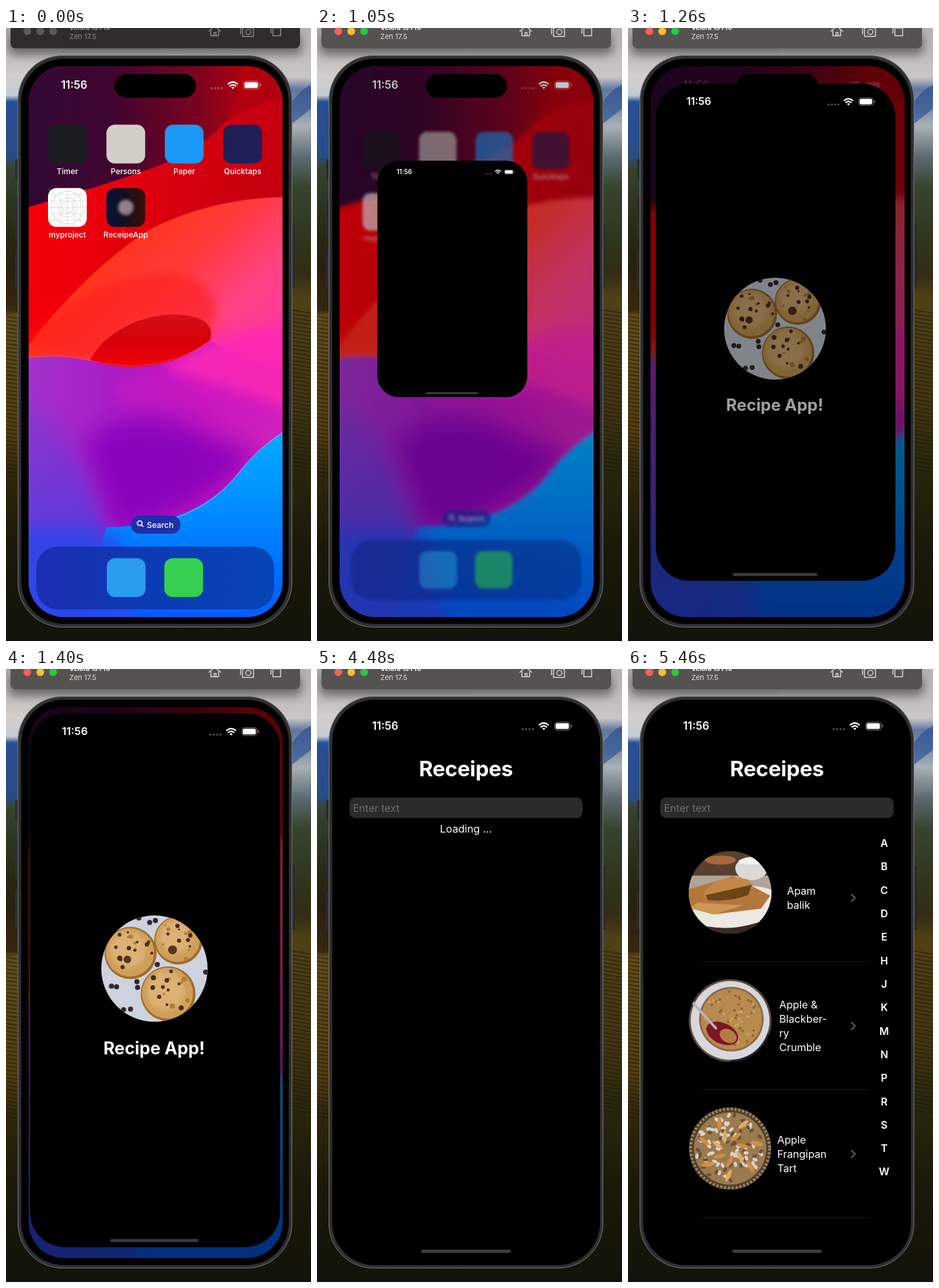
An HTML page for the animation above (8 s loop, 472x948 px).

```html
<!DOCTYPE html>
<html lang="en">
<head>
<meta charset="utf-8">
<title>Recipe app launch</title>
<style>
html, body { margin: 0; width: 100%; height: 100%; overflow: hidden; background: #14180c; }
svg { display: block; width: 472px; height: 948px; }
text { font-family: Inter, Roboto, sans-serif; fill: #fff; }
.mid { text-anchor: middle; }
.line { fill: none; stroke-linecap: round; stroke-linejoin: round; }
</style>
</head>
<body>
<svg id="stage" viewBox="0 0 472 948"></svg>
<script>
const stage = document.getElementById('stage');
const $ = id => document.getElementById(id);

let seed = 7;
const rnd = () => (seed = seed * 16807 % 2147483647) / 2147483647;
const times = (n, fn) => Array.from({ length: n }, (_, i) => fn(i)).join('');

// Markup helpers
const rect = (x, y, w, h, r, fill, extra = '') =>
  `<rect x="${x}" y="${y}" width="${w}" height="${h}" rx="${r}" fill="${fill}" ${extra}/>`;
const disc = (x, y, r, fill, extra = '') =>
  `<circle cx="${x}" cy="${y}" r="${r}" fill="${fill}" ${extra}/>`;
const oval = (x, y, rx, ry, fill, turn = 0) =>
  `<ellipse rx="${rx}" ry="${ry}" fill="${fill}" transform="translate(${x} ${y}) rotate(${turn})"/>`;
const shape = (d, fill, extra = '') => `<path d="${d}" fill="${fill}" ${extra}/>`;
const line = (d, color, width = 1, extra = '') =>
  `<path class="line" d="${d}" stroke="${color}" stroke-width="${width}" ${extra}/>`;
const text = (x, y, size, weight, str, extra = '') =>
  `<text x="${x}" y="${y}" font-size="${size}" font-weight="${weight}" ${extra}>${str}</text>`;
const mid = 'class="mid"';
const soft = n => `style="filter:blur(${n}px)"`;
const gradient = (id, dir, stops) => {
  const [x1, y1, x2, y2] = dir;
  return `<linearGradient id="${id}" x1="${x1}" y1="${y1}" x2="${x2}" y2="${y2}">` +
    stops.map(([at, c]) => `<stop offset="${at}" stop-color="${c}"/>`).join('') + '</linearGradient>';
};
const clip = (id, body) => `<clipPath id="${id}">${body}</clipPath>`;
const down = [0, 0, 0, 1], across = [0, 0, 1, 0];

const defs = `<defs>
${gradient('left', down, [[0, '#a8a5a3'], [.08, '#d2cfcc'], [.11, '#c5cbd4'], [.12, '#2d5599'], [.2, '#35527a'],
  [.23, '#36422f'], [.33, '#262b15'], [.39, '#2a1f10'], [.46, '#37270e'], [.47, '#624c1b'], [.66, '#543d10'],
  [.73, '#30260c'], [.84, '#1b1a09'], [1, '#12130a']])}
${gradient('right', down, [[0, '#b4b1af'], [.08, '#c9c7c6'], [.1, '#5f779f'], [.13, '#7c8ca6'], [.16, '#a9b0b6'],
  [.21, '#5c6b72'], [.26, '#36442f'], [.35, '#30351d'], [.4, '#332c15'], [.44, '#4f4017'], [.62, '#423513'],
  [.7, '#2c280e'], [.84, '#1b190a'], [1, '#12130a']])}
${gradient('dusk', across, [[0, '#2e0a35'], [.45, '#400530'], [.8, '#7c0320'], [1, '#b00010']])}
${gradient('red', across, [[0, '#fa0008'], [.5, '#dc000e'], [1, '#bd0010']])}
${gradient('coral', [.35, .1, .95, .65], [[0, '#ff3210'], [.35, '#ff3b3e'], [.6, '#ff4282'], [1, '#ff30b2']])}
${gradient('leaf', down, [[0, '#d41018'], [.5, '#d60008'], [1, '#ee0008']])}
${gradient('wave', across, [[0, '#a03acc'], [.35, '#aa1cc6'], [.65, '#c616be'], [1, '#d22cba']])}
${gradient('deep', down, [[0, '#5a3cdc00'], [.4, '#5a3cdcbb'], [.75, '#3a46e4'], [1, '#1446f4']])}
${gradient('sea', down, [[0, '#02b0ff'], [.3, '#0094ff'], [.6, '#0070ff'], [1, '#0648f4']])}
${gradient('dock', across, [[0, '#1b2fb2'], [.5, '#0c3bb4'], [1, '#0645b6']])}
${gradient('space', across, [[0, '#08123a'], [.5, '#14101c'], [1, '#3a0e08']])}
${clip('screen', rect(35, 59, 393, 852, 55, '#000'))}
${clip('frame', '<rect id="hole"/>')}
${clip('plate', disc(230.5, 460.5, 83.5, '#000'))}
${clip('dish', disc(0, 0, 64, '#000'))}
</defs>`;

const backdrop = rect(0, 0, 236, 948, 0, 'url(#left)') + rect(236, 0, 236, 948, 0, 'url(#right)') +
  shape('M0 120Q10 105 20 125V205H0ZM472 88Q455 95 440 118V150L472 125Z', '#244c92', 'opacity=".6"') +
  line(times(42, i => `M0 ${446 + i * 6}l20 3M442 ${436 + i * 6}l30 5`), '#1c1a08', 2, 'opacity=".55"') +
  rect(4, 10, 454, 32, 10, '#000', `opacity=".4" ${soft(7)}`);

const toolbar = rect(7, -20, 448, 51.5, 8, '#555351', 'id="bar"') +
  times(3, i => disc(33 + i * 20, 5, 6, '#5b5a5a', `id="light${i}"`)) +
  '<g id="caption">' + text(98, 3, 10, 700, 'Velora 15 Pro') +
  text(98, 17, 11, 400, 'Zen 17.5', 'opacity=".8"') +
  line('M314 5l9-8 9 8M317 4v8h12v-8M322 12v-5h3v5' +
    'M366 0h3l2-3h6l2 3h4v13h-17ZM363 9v-11M371 6a4 4 0 1 0 8 0a4 4 0 1 0-8 0' +
    'M413 0h12v12h-12ZM410 8v-12', '#d8d6d4', 1.5) + '</g>';

const phone = rect(14, 203, 8, 32, 2, '#2c2c2e') + rect(14, 263, 8, 61, 2, '#2c2c2e') +
  rect(14, 342, 8, 62, 2, '#2c2c2e') + rect(439, 304, 8, 99, 2, '#2c2c2e') +
  rect(18.5, 42.5, 424, 884, 69, '#303032', 'stroke="#77777a"') +
  rect(23.5, 47.5, 414, 874, 65, '#000', 'stroke="#1a1a1b"');

const crest = 'M0 516Q70 500 130 514Q196 530 250 515Q292 503 316 483';
const wallpaper = rect(0, 20, 472, 930, 0, 'url(#red)') +
  shape('M0 20H372Q372 95 337 147Q300 190 225 217T0 287Z', 'url(#dusk)') +
  shape('M372 20Q372 95 337 147Q400 110 440 105V20Z', '#a8000e', 'opacity=".7"') +
  shape('M0 540Q100 392 220 313Q330 255 472 262V680H0Z', 'url(#coral)') +
  shape('M20 500Q100 400 210 385Q300 360 326 430L316 483Q250 400 130 514Z', '#ff1c18', `opacity=".55" ${soft(7)}`) +
  shape(crest + 'Q370 515 472 535V810H0Z', 'url(#wave)') +
  shape('M250 515Q292 503 316 483Q380 455 472 470V600Q380 580 250 530Z', '#fc28b6', `opacity=".9" ${soft(10)}`) +
  line('M190 562Q300 540 430 610', '#d018c2', 36, `opacity=".6" ${soft(12)}`) +
  shape('M120 640Q210 570 320 635L390 655Q310 750 170 780Z', '#8400bc', `opacity=".85" ${soft(18)}`) +
  shape('M-40 540Q100 570 150 772L190 990H-40Z', 'url(#deep)', soft(14)) +
  shape('M130 514C152 470 210 443 260 443Q326 445 316 483Q262 524 196 524Q160 524 130 514Z', 'url(#leaf)') +
  line(crest, '#ff5a70', 1, 'opacity=".6"') +
  shape('M472 600Q400 637 365 682Q300 770 155 772L100 990H472Z', 'url(#sea)') +
  shape('M0 776H150Q210 800 190 990H0Z', '#2c48ea', `opacity=".85" ${soft(12)}`) +
  line('M472 600Q400 637 365 682Q325 736 262 758', '#9cd8ff', 1, 'opacity=".8"');

const apps = [['Timer', '#1a1d20'], ['Persons', '#d1cfc7'], ['Paper', '#1c98f6'],
  ['Quicktaps', '#1e2056'], ['myproject', '#fff'], ['ReceipeApp', 'url(#space)']];
const icons = apps.map(([name, fill], i) => {
  const x = 65 + i % 4 * 90.4, y = i < 4 ? 149.5 : 247.5;
  return `<g ${i == 5 ? 'id="launcher"' : ''}>` + rect(x, y, 60, 60, 13, fill) +
    (i == 5 ? disc(x + 30, y + 30, 12, '#8f7f88', soft(2)) : '') +
    text(x + 30, y + 76, 12, 500, name, mid) + '</g>';
}).join('') +
  line(times(5, i => `M${75 + i * 10} 248v59M66 ${257.5 + i * 10}h58`) + 'M66 249l58 57M124 249l-58 57', '#d4d4d4', .6) +
  [9, 15, 25].map(r => disc(95, 277.5, r, 'none', 'stroke="#c4c4c4" stroke-width=".7"')).join('') +
  rect(193, 754, 77, 28, 14, '#1d30a8') + line('M212 771l-2.6-2.6a3.6 3.6 0 1 1 .1-.1', '#fff', 1.5) +
  text(218, 772.5, 12.3, 500, 'Search') +
  rect(47, 802, 368, 97, 33, 'url(#dock)') +
  rect(156, 820, 60, 60, 13, '#2a9cee') + rect(245, 820, 60, 60, 13, '#35d04f');

const status = text(105.5, 94, 16.8, 600, '11:56', mid) +
  times(4, i => disc(318.3 + i * 5.3, 93, 1.7, '#fff', 'opacity=".3"')) +
  line('M344 86.5q7-6 14 0M346.7 89.6q4.3-3.6 8.6 0', '#fff', 2.2) + shape('M348.6 91.8q2.4-1.8 4.8 0L351 94.4Z', '#fff') +
  rect(367.5, 82, 24, 12.5, 4, 'none', 'stroke="#fff" stroke-opacity=".45"') +
  rect(369.2, 83.7, 20.6, 9.1, 2.6, '#fff') + rect(393, 86, 1.5, 4.5, .8, '#fff', 'opacity=".5"');

const cookie = (x, y, r) => disc(x, y, r, '#a06c2a') + disc(x - 1, y - 1, r - 3, '#cf9f5a') +
  disc(x - 4, y - 5, r - 13, '#dcb274', soft(4)) +
  times(16, () => {
    const a = rnd() * 6.28, d = Math.sqrt(rnd()) * r * .85;
    return disc(x + d * Math.cos(a), y + d * Math.sin(a), 1.6 + rnd() * 2.6, rnd() < .6 ? '#4c2a18' : '#b27c38');
  });
const chips = [[223, 388], [232, 385], [206, 381], [163, 488], [171, 489], [203, 481],
  [204, 490], [182, 525], [193, 524], [235, 454], [311, 466]];
const splash = '<g clip-path="url(#plate)">' + rect(140, 370, 180, 180, 0, '#ced2de') +
  chips.map(([x, y]) => disc(x, y, 4, '#34292a')).join('') +
  cookie(193, 436, 41) + cookie(268, 416, 38) + cookie(252, 500, 43) +
  disc(188, 446, 6, '#5a3420') + disc(259, 431, 7, '#5a3420') + '</g>' +
  text(230, 595, 27, 700, 'Recipe App!', mid);

const pancakes = rect(-64, -64, 128, 128, 0, '#58402f') + rect(-64, -26, 128, 60, 0, '#b0a397') +
  oval(-15, -50, 24, 7, '#a8683c') + oval(33, -37, 25, 18, '#dcdad6') + oval(33, -48, 20, 5, '#f3f1ed') +
  oval(5, 25, 78, 34, '#ece8e2', -8) +
  shape('M-64-5L5-25L62 5L48 25L-25 34L-64 24Z', '#b3763d') +
  shape('M-40 0Q-20-30 28-20L36-6Q0 4-40 8Z', '#c58747') + shape('M-38 4Q0-4 34-12L28 4Q0 15-34 12Z', '#6e4518') +
  shape('M-50 16L20 20L-25 34L-64 24Z', '#cf9655') + shape('M-64 45Q0 68 64 38V64H-64Z', '#3a2a22');
const crumble = rect(-64, -64, 128, 128, 0, '#5b4a3c') + rect(0, 20, 64, 44, 0, '#1c2038') +
  disc(0, 0, 61, '#d8d8dc') + disc(2, -2, 50, '#8d6a48') + disc(2, -2, 47, '#b78a4e') +
  times(60, () => {
    const a = rnd() * 6.28, d = Math.sqrt(rnd()) * 44;
    return disc(2 + d * Math.cos(a), -2 + d * Math.sin(a), 2, rnd() < .5 ? '#d0a566' : '#916430');
  }) + oval(-12, 20, 26, 16, '#7c1626', 25) + oval(-3, 24, 14, 10, '#b47a44', 30) +
  line('M-60-30L-22 12', '#b9b6b2', 4);
const tart = disc(0, 0, 64, '#51402f') +
  disc(0, 0, 61, 'none', 'stroke="#a48a64" stroke-width="4" stroke-dasharray="3 3"') + disc(0, 0, 56, '#9c7a50') +
  times(90, () => {
    const a = rnd() * 6.28, d = Math.sqrt(rnd()) * 53;
    return oval(d * Math.cos(a), d * Math.sin(a), 4, 2.5, rnd() < .65 ? '#d9d3ca' : '#6e5236', rnd() * 180);
  }) + times(20, i => {
    const a = i * .9 - 2, d = i < 7 ? 20 : 42;
    return oval(d * Math.cos(a), d * Math.sin(a), 10, 3, i % 3 ? '#cf8f3f' : '#e0ad62', a * 57 + 25);
  });

const recipes = [
  [pancakes, 246, 349, ['Apam', 'balik']],
  [crumble, 234, 525, ['Apple &amp;', 'Blackber-', 'ry', 'Crumble']],
  [tart, 231, 734, ['Apple', 'Frangipan', 'Tart']]
];
const list = recipes.map(([photo, x, y, words], i) => {
  const cy = 345.5 + i * 198;
  return `<g id="photo${i}" clip-path="url(#dish)" transform="translate(158 ${cy})">${photo}</g>` +
    words.map((w, j) => text(x, y + j * 22, 16.2, 400, w)).join('') +
    line(`M346 ${cy + 3}l5.5 5.5l-5.5 5.5`, '#5c5c60', 2) + rect(114, cy + 106.5, 259, 1, 0, '#19191a');
}).join('') + [...'ABCDEHJKMNPRSTW'].map((c, i) => text(396.5, 275 + i * 36.32, 16, 600, c, mid)).join('');

const page = text(230.5, 166, 33, 700, 'Receipes', mid + ' letter-spacing="-.3"') +
  rect(50, 198.5, 361, 32, 9, '#2b2b2c') + text(55.5, 221, 16, 400, 'Enter text', 'style="fill:#6c6c70"') +
  text(230.5, 253, 16.3, 400, 'Loading ...', mid + ' id="loading"') + `<g id="list">${list}</g>`;

stage.innerHTML = defs + backdrop + toolbar + phone +
  `<g clip-path="url(#screen)"><g id="wall">${wallpaper}</g><g id="icons">${icons}</g><g id="clock">${status}</g></g>
  ${rect(24, 48, 414, 874, 65, '#000', 'id="dim"')}
  <g id="app" clip-path="url(#frame)">${rect(24, 48, 414, 874, 0, '#000')}
  <g id="content">${status}<g id="splash">${splash}</g><g id="page">${page}</g></g>
  ${rect(-69.5, -2.5, 139, 5, 2.5, '#3b3b3c', 'id="pill"')}</g>` +
  rect(168, 71, 126, 37, 18.5, '#000');

const clamp = v => Math.max(0, Math.min(1, v));
const show = (id, on) => $(id).setAttribute('opacity', +on);
const set = (el, attrs) => { for (const k in attrs) el.setAttribute(k, attrs[k]); };
const lights = ['#ff5f57', '#febc2e', '#28c840'];

function draw(ms) {
  const t = Math.floor(ms / 70) * 70;
  const active = t >= 840, open = t >= 1050;

  $('bar').setAttribute('fill', active ? '#555351' : '#2e2c2c');
  lights.forEach((c, i) => $('light' + i).setAttribute('fill', active ? c : '#5b5a5a'));
  show('caption', active ? 1 : .55);

  // Home screen recedes while the app window springs open
  const fade = open ? 1 - Math.exp((980 - t) / 110) : 0;
  $('wall').style.filter = fade ? `blur(${8 * fade}px)` : 'none';
  show('dim', Math.max(.5 * fade, clamp((t - 1200) / 400)));
  const k = 1 - .07 * fade, gone = open ? clamp((t - 980) / 210) : 0;
  $('icons').setAttribute('transform', `translate(231 485) scale(${k}) translate(-231 -485)`);
  $('icons').style.filter = gone ? `blur(${7 * gone}px)` : 'none';
  show('icons', 1 - gone);
  show('launcher', !open);
  show('clock', clamp((1324 - t) / 255));

  const rest = (start, tau) => Math.exp((start - t) / tau);
  const qx = rest(973, 106), qy = rest(1018, 125), qh = rest(992, 119);
  const x = 35 + 121 * qx, y = 59 + 189 * qy, w = 393 - 333 * qx, h = 852 - 792 * qh, s = w / 393;
  show('app', open);
  set($('hole'), { x, y, width: w, height: h, rx: 55 * s });
  $('content').setAttribute('transform', `translate(${x} ${y}) scale(${s}) translate(-35 -59)`);
  $('pill').setAttribute('transform', `translate(${x + w / 2 - s} ${y + h - 10.5 * s}) scale(${s})`);

  show('splash', t < 4480 ? clamp((t - 1120) / 225) : 0);
  show('page', t >= 4480);
  show('loading', t < 5040);
  show('list', t >= 5040);
  recipes.forEach((_, i) => show('photo' + i, t >= 5320 + i * 70));
}

function tick() {
  draw(performance.now() % 8000);
  requestAnimationFrame(tick);
}
tick();
</script>
</body>
</html>
```
